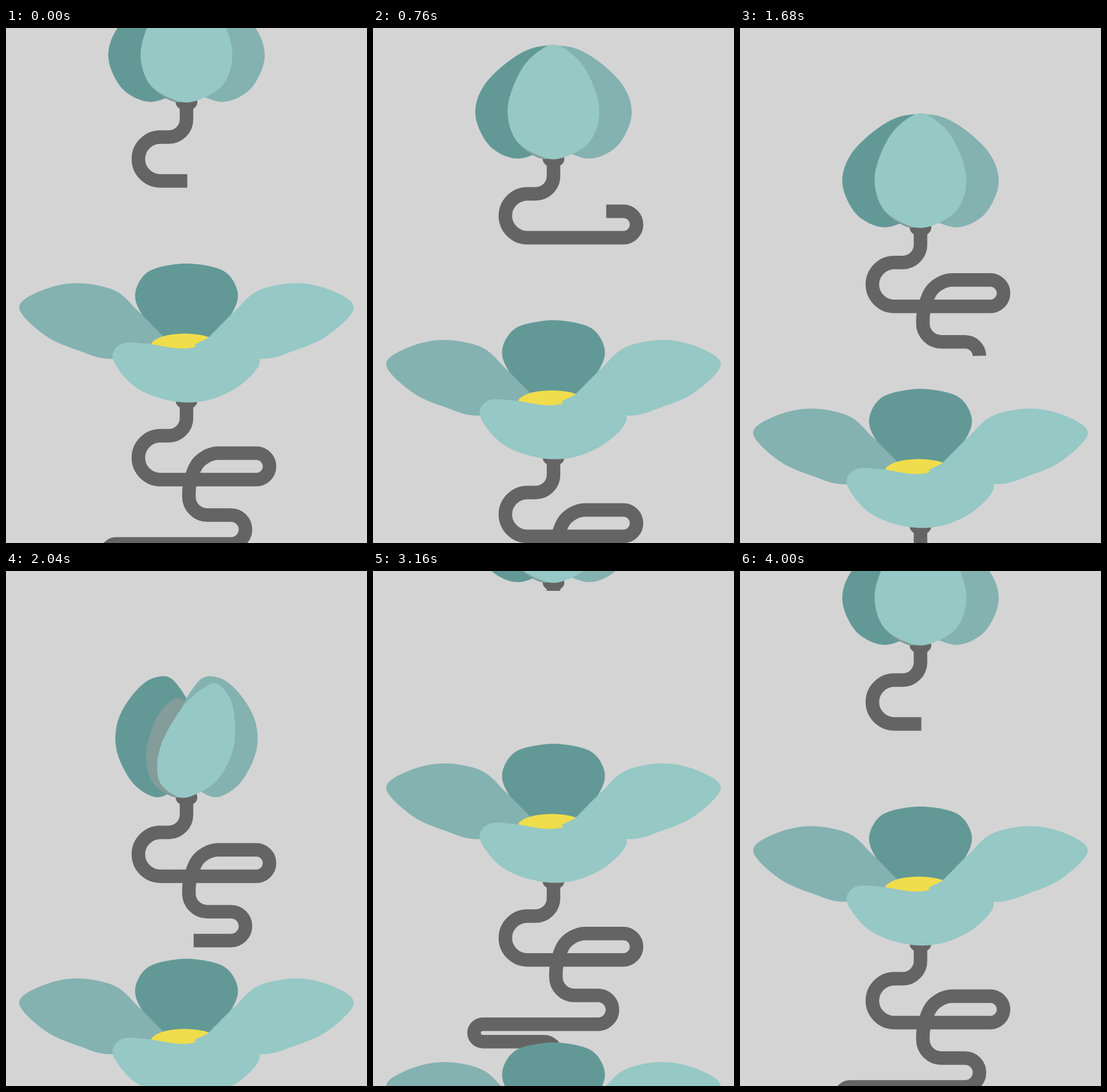
An HTML page that plays this animation: 600x857 px, repeating every 4.04 s.

```html
<!DOCTYPE html>
<html lang="en">
<head>
<meta charset="utf-8">
<title>Growing flowers</title>
<style>
  html, body { margin: 0; height: 100%; overflow: hidden; background: #d4d4d4; }
  svg { display: block; width: 100vw; height: 100vh; }
</style>
</head>
<body>
<svg id="stage" viewBox="0 0 600 857"></svg>
<script>
const LOOP = 4040, STEP = 40, CYCLE = 4000;
const SPACING = 497, BASE_Y = 122.5;
const STEM_COLOR = '#646464';
const DARK = [98, 153, 151], MID = [132, 178, 177], LIGHT = [150, 200, 197];
const GREY = [132, 156, 154], YELLOW = '#f0dd4b';

// Corners of the stem, from the flower base downwards
const STEM = [[0, 0], [0, 59], [-80, 59], [-80, 132], [138, 132], [138, 88], [28, 88], [4, 130],
  [4, 191], [98, 191], [98, 239], [-132, 239], [-132, 268], [5, 268], [5, 310]];

// Outlines run clockwise from the lower left, all with ten points
const symmetric = half => [...half.map(([x, y]) => [-x, y]).reverse(), ...half];
const SIDE_BUD = [[0, -30], [-45, -110], [-15, -178], [25, -186], [70, -165],
  [115, -122], [130, -75], [112, -28], [80, -4], [45, -2]];
const WING = [[18, -88], [38, -106], [80, -148], [120, -183], [185, -195],
  [245, -181], [278, -153], [235, -108], [180, -83], [121, -69]];
const FRONT = [[-25, 1], [-85, -22], [-122, -68], [-108, -94], [-65, -94],
  [-5, -86], [60, -95], [121, -69], [92, -27], [35, 0]];
const FRONT_BUD = symmetric([[14, -185], [52, -150], [76, -85], [62, -30], [18, -2]]);
const BACK = symmetric([[22, -226], [65, -213], [85, -180], [76, -146], [40, -105]]);

// Moves an outline by an affine matrix, in the order SVG uses
const warp = (pts, a, b, c, d, e, f) =>
  pts.map(([x, y]) => [a * x + c * y + e, b * x + d * y + f]);
const stretchedSide = warp(SIDE_BUD, 0.8, 0, -0.17, 1.07, 0, 0);
const flatWing = warp(WING, 1, 0.071, 0, 0.533, 0, -16);
const innerBud = warp(FRONT_BUD, 0.7, 0, 0, 0.87, 14, 0);

// Poses: bud, stretched, overshoot, open
const POSE_TIMES = [0.45, 0.51, 0.62, 0.72];
const BACK_PETAL = {
  side: -1, colors: [DARK, DARK, DARK, DARK],
  poses: [SIDE_BUD, stretchedSide, warp(BACK, 1, 0, 0, 0.475, 0, -17.6), BACK]
};
const LEFT_PETAL = {
  side: -1, colors: [GREY, GREY, MID, MID],
  poses: [innerBud, innerBud, flatWing, WING]
};
const RIGHT_PETAL = {
  side: 1, colors: [MID, MID, LIGHT, LIGHT],
  poses: [SIDE_BUD, stretchedSide, flatWing, WING]
};
const FRONT_PETAL = {
  side: 1, colors: [LIGHT, LIGHT, LIGHT, LIGHT],
  poses: [FRONT_BUD, warp(FRONT_BUD, 0.8, 0, -0.27, 1, -5, 0),
    warp(FRONT, 0.88, 0, 0, 0.84, 0, 9.5), FRONT]
};
// Yellow centre: cx, cy, rx, ry
const HEART = [[-5, -80, 25, 10], [-5, -80, 25, 10], [0, -69, 55, 22], [-3, -91, 56, 20]];

const clamp = v => Math.max(0, Math.min(1, v));
const mix = (a, b, k) => a.map((v, i) => v + (b[i] - v) * k);

function set(el, attrs) {
  for (const name in attrs) el.setAttribute(name, attrs[name]);
}

function add(parent, tag, attrs = {}) {
  const el = document.createElementNS('http://www.w3.org/2000/svg', tag);
  set(el, attrs);
  return parent.appendChild(el);
}

// Polyline whose corners are rounded as far as their shorter side allows
function rounded(pts) {
  const gap = (a, b) => Math.hypot(a[0] - b[0], a[1] - b[1]);
  let d = 'M' + pts[0];
  for (let i = 1; i < pts.length - 1; i++) {
    const [prev, p, next] = pts.slice(i - 1, i + 2);
    const r = Math.min(gap(prev, p), gap(p, next)) / 2;
    const from = mix(p, prev, r / gap(prev, p)), to = mix(p, next, r / gap(p, next));
    d += 'L' + from + 'C' + [mix(from, p, 0.55), mix(to, p, 0.55), to];
  }
  return d + 'L' + pts.at(-1);
}

// Closed smooth curve through all points
function smooth(pts) {
  const n = pts.length;
  const at = i => pts[(i + n) % n];
  const handle = (p, a, b, s) => p.map((v, i) => v + s * (b[i] - a[i]) / 6);
  return 'M' + pts[0] + pts.map((p, i) => {
    const next = at(i + 1);
    return 'C' + [handle(p, at(i - 1), next, 1), handle(next, p, at(i + 2), -1), next];
  }).join('') + 'Z';
}

function poseAt(age) {
  let i = 0;
  while (i < 2 && age > POSE_TIMES[i + 1]) i++;
  const k = clamp((age - POSE_TIMES[i]) / (POSE_TIMES[i + 1] - POSE_TIMES[i]));
  return [i, k * k * (3 - 2 * k)];
}

function makePetal(group, { side, colors, poses }) {
  const path = add(group, 'path', { transform: `scale(${side} 1)` });
  return (i, k) => set(path, {
    d: smooth(poses[i].map((p, j) => mix(p, poses[i + 1][j], k))),
    fill: `rgb(${mix(colors[i], colors[i + 1], k).map(Math.round)})`
  });
}

function makeHeart(group) {
  const ellipse = add(group, 'ellipse', { fill: YELLOW });
  return (i, k) => {
    const [cx, cy, rx, ry] = mix(HEART[i], HEART[i + 1], k);
    set(ellipse, { cx, cy, rx, ry });
  };
}

function makeFlower() {
  const group = add(stage, 'g');
  const stem = add(group, 'path', {
    d: rounded(STEM), fill: 'none', stroke: STEM_COLOR, 'stroke-width': 22.5
  });
  const collar = add(group, 'ellipse', { cy: 1, rx: 18, fill: STEM_COLOR });
  const parts = [
    makePetal(group, BACK_PETAL),
    makePetal(group, LEFT_PETAL),
    makeHeart(group),
    makePetal(group, RIGHT_PETAL),
    makePetal(group, FRONT_PETAL)
  ];

  return age => {
    const grown = Math.max(0, 249 + 1115 * age);
    const [i, k] = poseAt(age);
    set(group, { transform: `translate(300 ${BASE_Y + SPACING * age})` });
    set(stem, { 'stroke-dasharray': `${grown} 3000` });
    set(collar, { ry: 14 * clamp(grown / 14) });
    for (const draw of parts) draw(i, k);
  };
}

const stage = document.getElementById('stage');
const flowers = [-1, 0, 1].map(offset => ({ offset, draw: makeFlower() }));
const start = performance.now();

function frame() {
  const time = (performance.now() - start) % LOOP;
  const progress = Math.floor(time / STEP) * STEP / CYCLE;
  for (const { offset, draw } of flowers) draw(progress + offset);
  requestAnimationFrame(frame);
}
frame();
</script>
</body>
</html>
```
